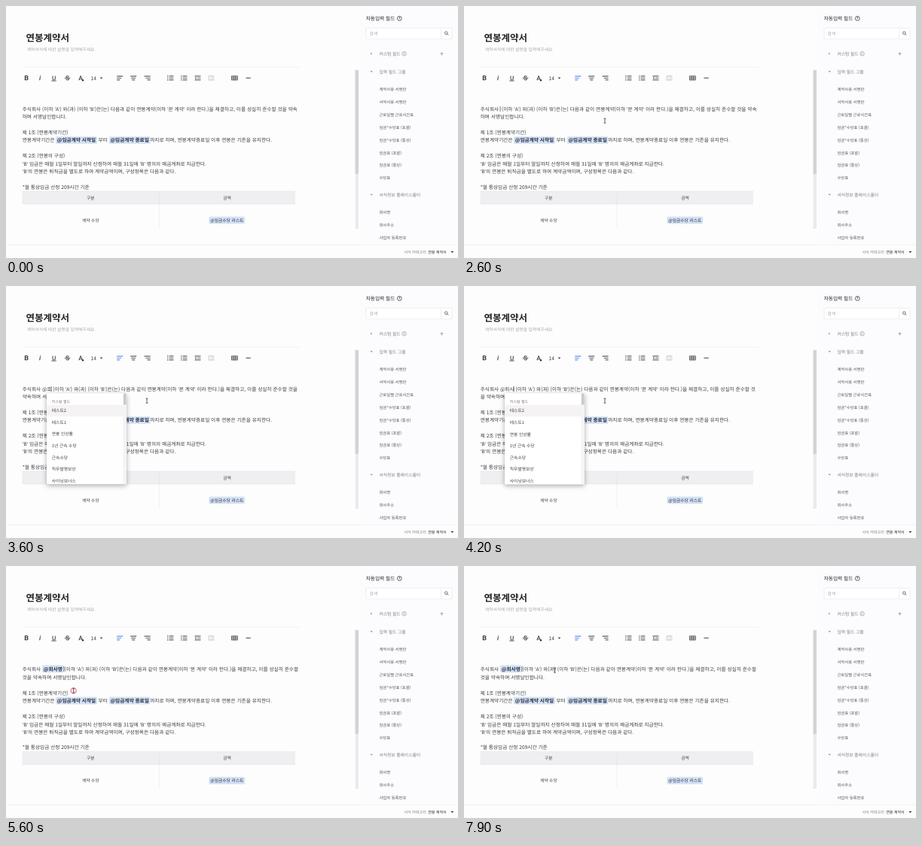
An HTML page for the animation above (8000 ms loop, 600x336 px).

```html
<!DOCTYPE html>
<html lang="ko">
<head>
<meta charset="utf-8">
<style>
html, body { margin: 0; width: 100%; height: 100%; overflow: hidden; background: #fdfdfd; }
svg { display: block; width: 600px; height: 336px; }
text { font-family: "Noto Sans CJK KR", "Noto Sans CJK", "Noto Sans KR", sans-serif; white-space: pre; text-rendering: geometricPrecision; }
.quote { font-family: "Noto Sans", sans-serif; }
.tool { font-family: Roboto, "Liberation Sans", sans-serif; }
.shadow { filter: drop-shadow(0 2px 3px rgba(0,0,0,.32)); }
</style>
</head>
<body>
<svg id="stage" viewBox="0 0 600 336"></svg>
<script>
const LOOP = 8000;
const INK = '#3d3d42', DARK = '#25252a', GREY = '#7b7b80', BLUE = '#3f7fe8';
const BODY = 6.667, SMALL = 5.75, ITEM = 5.35, TINY = 5;
const REST = "(이하 'A') 와(과) (이하 'B')은(는) 다음과 같이 연봉계약(이하 '본 계약' 이라 한다.)을 체결하고, 이를 성실히 준수할 것을 약속하며 서명날인합니다.";

const quoted = str => str.replace(/'/g, '<tspan class="quote">\'</tspan>');
// Text placed by its vertical middle
const text = (x, mid, size, str, fill = INK, attrs = '') =>
  `<text x="${x}" y="${(mid + size * 0.38).toFixed(2)}" font-size="${size}" fill="${fill}" ${attrs}>${quoted(str)}</text>`;
const rect = (x, y, w, h, fill, attrs = '') =>
  `<rect x="${x}" y="${y}" width="${w}" height="${h}" fill="${fill}" ${attrs}/>`;
const line = (d, color, width = 0.5, attrs = '') =>
  `<path d="${d}" stroke="${color}" stroke-width="${width}" fill="none" ${attrs}/>`;
const shape = (d, fill) => `<path d="${d}" fill="${fill}"/>`;
const circle = (x, y, r, color, width = 0.6) =>
  `<circle cx="${x}" cy="${y}" r="${r}" fill="none" stroke="${color}" stroke-width="${width}"/>`;
const chip = (x, mid, w, str, size = BODY, weight = 700) =>
  rect(x, mid - 4.9, w, 9.8, '#d5e1f5', 'rx="1.6"') +
  text(x + w / 2, mid, size, str, '#27303f', `font-weight="${weight}" text-anchor="middle"`);
const MIDDLE = 'text-anchor="middle"';

function header() {
  return text(26.6, 42, 12.5, '연봉계약서', DARK, 'font-weight="700"') +
    text(27.8, 58, SMALL, '계약서식에 대한 설명을 입력해주세요.', '#a9a9ad') +
    line('M22 81.5H390', '#e9e9ec');
}

function alignIcon(x, side, id = '') {
  const d = [8, 6, 4].map((w, i) =>
    `M${x - 4 + (8 - w) * side} ${93.6 + i * 2.5}h${w}`).join('');
  return line(d, INK, 0.95, id);
}

function listIcon(x, numbered) {
  return [93.4, 96, 98.6].map(y =>
    line(`M${x - 1.6} ${y}h5.8`, INK, 0.95) +
    (numbered ? line(`M${x - 3.4} ${y - 0.9}v1.8`, INK, 0.8) : rect(x - 4.1, y - 0.6, 1.2, 1.2, INK))
  ).join('');
}

function indentIcon(x, dir, color) {
  const tip = x - 2.9 + dir * 0.9, back = x - 2.9 - dir * 0.9;
  return line(`M${x - 4} 93.4h8M${x - 0.6} 96h4.6M${x - 4} 98.6h8`, color, 0.9) +
    shape(`M${back} 94.5V97.5L${tip} 96Z`, color);
}

function toolbar() {
  const glyph = (x, s, attrs, size = 9, y = 99.2) =>
    `<text class="tool" x="${x}" y="${y}" font-size="${size}" fill="${INK}" text-anchor="middle" ${attrs}>${s}</text>`;
  return glyph(27.2, 'B', 'font-weight="700"') +
    glyph(45.2, 'i', 'font-weight="500" font-style="italic"') +
    glyph(63.5, 'U', 'font-weight="500"', 8, 98.5) + line('M60.2 99.9h6.6', INK, 0.8) +
    glyph(81.5, 'S', 'font-weight="500"', 8.6) + line('M77.6 96.1h7.8', INK, 0.8) +
    glyph(99.2, 'A', 'font-weight="500"', 8.6) + `<circle cx="102" cy="99" r="1.3" fill="${INK}"/>` +
    text(116.2, 96, BODY, '14', INK, MIDDLE) + shape('M124.6 95.2h3.8l-1.9 2z', INK) +
    alignIcon(151.2, 0, 'id="left"') + alignIcon(169.2, 0.5) + alignIcon(187.6, 1) +
    listIcon(218.2, false) + listIcon(236.2, true) +
    indentIcon(254.5, -1, INK) + indentIcon(272.6, 1, '#b9b9bd') +
    line('M299.5 93.2h7.8v5.6h-7.8zM299.5 95.1h7.8M299.5 97h7.8M302.1 93.2v5.6M304.7 93.2v5.6', INK, 0.75) +
    line('M318.4 96h6.4', INK, 1);
}

function contract() {
  const rows = [
    [168.6, '제 1조 (연봉계약기간)'],
    [199.9, '제 2조 (연봉의 구성)'],
    [210.4, "'B' 임금은 매월 1일부터 말일까지 산정하여 매월 31일에 'B' 명의의 예금계좌로 지급한다."],
    [220.7, "'B'의 연봉은 퇴직금을 별도로 하여 계약금액이며, 구성항목은 다음과 같다."],
    [241.3, '*월 통상임금 산정 209시간 기준']
  ].map(([y, s]) => text(21.7, y, BODY, s)).join('');
  const y = 178.9;
  return rows + text(21.7, y, BODY, '연봉계약기간은') +
    chip(66, y, 55, '@임금계약 시작일') + text(122.6, y, BODY, '부터') +
    chip(136.8, y, 54.6, '@임금계약 종료일') +
    text(191.2, y, BODY, '까지로 하며, 연봉계약종료일 이후 연봉은 기존을 유지한다.') +
    rect(21.5, 247, 362.5, 17, '#efeff2') +
    line('M21.5 247H384M21.5 264H384', '#dedee3') +
    line('M203.2 247V300', '#dcdce1') +
    text(112.3, 255.6, SMALL, '구분', INK, MIDDLE) + text(293.5, 255.6, SMALL, '금액', INK, MIDDLE) +
    text(112.3, 285.6, SMALL, '계약 수당', INK, MIDDLE) +
    chip(269.5, 285.6, 47.6, '@임금수당 리스트', SMALL, 500);
}

function sidebar() {
  const group = (y, s, open) =>
    shape(open ? `M483.6 ${y - 0.8}h3.2l-1.6 1.8z` : `M484.4 ${y - 1.4}v2.8l1.7-1.4z`, GREY) +
    text(495.5, y, SMALL, s, GREY);
  const items = [
    [111.2, '계약사용 서명란'], [128, '서약서용 서명란'], [145, '근로일별 근로시간표'],
    [162, '임금*수당표 (포괄)'], [178.8, '임금*수당표 (통상)'], [195.6, '임금표 (포괄)'],
    [212.4, '임금표 (통상)'], [229.3, '수당표'],
    [275, '회사명'], [292, '회사주소'], [309, '사업자 등록번호']
  ].map(([y, s]) => text(495.4, y, ITEM, s, '#55555a')).join('');
  return rect(470, 0, 130, 318, '#fcfbfd') +
    text(477.7, 16.8, BODY, '자동입력 필드', DARK, 'font-weight="500"') +
    circle(522.3, 16.6, 2.9, DARK, 0.7) + text(522.3, 16.7, 4.6, '?', DARK, 'text-anchor="middle" font-weight="700"') +
    rect(478, 29.3, 114, 14.6, '#fff', 'stroke="#dcdce0" stroke-width=".5" rx="1"') +
    line('M577.3 29.3v14.6', '#dcdce0') +
    text(482.6, 36.6, SMALL, '검색', '#a3a3a8') +
    circle(584.3, 36, 1.8, INK, 0.7) + line('M585.6 37.3l1.7 1.7', INK, 0.8) +
    group(63.6, '커스텀 필드', false) + circle(528.6, 63.6, 2.7, GREY) +
    line('M528.6 63.2v1.8M528.6 62v.6', GREY, 0.6) + line('M576.3 63.6h4.4M578.5 61.4v4.4', GREY, 0.6) +
    group(87.6, '입력 필드 그룹', true) + group(251.6, '서식정보 플레이스홀더', true) + items;
}

function footer() {
  return rect(0, 318, 600, 18, '#fdfdfd') + line('M0 318.4H600', '#e4e4e7') +
    text(528.4, 328, TINY, `서식 카테고리: <tspan fill="${DARK}" font-weight="500">연봉 계약서</tspan>`, GREY) +
    shape('M590.4 327h4l-2 2.2z', INK);
}

function menu(id, w, title, items, active, bar) {
  const list = items.map((s, i) => text(60.8, 166.2 + i * 15.57, SMALL, s)).join('');
  return `<g id="${id}">` + rect(54, 143, w, 121.4, '#fff', 'rx="1.5" class="shadow"') +
    '<g clip-path="url(#menuClip)">' + rect(54, 158.6, w, 15.4, active) +
    text(60.8, 153.8, TINY, title, '#77777c') + list +
    (bar ? rect(155.6, 143, 4.4, 121.4, '#f4f4f5') + rect(156, 143.4, 3.6, 14.8, '#c9c9cc') : '') +
    '</g></g>';
}

const stage = document.getElementById('stage');
stage.innerHTML =
  '<clipPath id="page"><rect x="0" y="82" width="463" height="215"/></clipPath>' +
  '<clipPath id="menuClip"><rect x="54" y="143" width="106" height="121.4" rx="1.5"/></clipPath>' +
  rect(0, 0, 600, 336, '#fdfdfd') + header() + toolbar() +
  '<g clip-path="url(#page)">' + text(21.7, 137.2, BODY, '', INK, 'id="first"') +
  '<g id="field">' + chip(48, 137.2, 28.6, '@회사명') + text(77.6, 137.2, BODY, '', INK, 'id="after"') + '</g>' +
  '<g id="below">' + text(21.7, 147.8, BODY, '', INK, 'id="second"') + contract() + '</g></g>' +
  rect(463.6, 85.5, 4.4, 211.5, '#ebebed') + rect(463.6, 85.5, 4.4, 138.5, '#d3d3d6') +
  sidebar() + footer() +
  line('M0 133.6v7.2', '#222', 0.6, 'id="caret"') +
  menu('full', 106, '커스텀 필드',
    ['테스트2', '테스트1', '연봉 인상률', '1년 근속 수당', '근속수당', '직무발명보상', '사이닝보너스'], '#f5f3f3', true) +
  menu('found', 78, '자동입력 필드', ['회사명', '회사주소', '회사 직인'], '#ededee', false) +
  '<circle id="ring"/><g id="pointer">' +
  line('M-1.4-3H1.4M0-3V3M-1.4 3H1.4', '#222', 0.7, 'id="beam"') +
  '<path id="hand" fill="#fff" stroke="#222" stroke-width=".6" d="M-.8 4V.3a.8.8 0 0 1 1.6 0V2.6l2.4.6q.9.3.8 1.3l-.5 2.6q-.2.7-.9.7H.4q-.6 0-1-.5l-2-2.4q.2-1 1.4-.3z"/></g>';

const el = {};
stage.querySelectorAll('[id]').forEach(n => el[n.id] = n);
const show = (node, on) => node.setAttribute('visibility', on ? 'visible' : 'hidden');
const clamp = v => Math.max(0, Math.min(1, v));
const easeOut = v => 1 - (1 - v) ** 2;

// time, typed head, start of the second line, caret x
const TYPING = [
  [0, '주식회사 ', '하며 서', 46.6],
  [2600, '주식회사  ', '하며 서', 48.1],
  [3000, '주식회사 @ ', '속하며', 54.1],
  [3200, '주식회사 @ㅎ ', '약속하며', 60.2],
  [3500, '주식회사 @호 ', '약속하며', 60.2],
  [3700, '주식회사 @회 ', '약속하며', 60.2],
  [3900, '주식회사 @회ㅅ ', '을 약속', 66.2],
  [4100, '주식회사 @회사 ', '을 약속', 66.2],
  [5550, '주식회사', '것을 약속', 76.9]
];
const PATH = [
  [100, 195, 50], [900, 42, 139.5], [1000, 42, 139.5], [1300, 45, 138], [1600, 45, 138],
  [2100, 187, 153], [4950, 187, 153], [5300, 89.7, 166.2], [5900, 89.7, 166.2],
  [6400, 127, 147], [6700, 120.5, 139]
];
const CLICKS = [1450, 5500];
const INSERT = 5550;

function pointerAt(t) {
  let i = 0;
  while (i < PATH.length - 2 && t >= PATH[i + 1][0]) i++;
  const [t0, x0, y0] = PATH[i], [t1, x1, y1] = PATH[i + 1];
  const p = clamp((t - t0) / (t1 - t0)), e = p * p * (3 - 2 * p);
  return [x0 + (x1 - x0) * e, y0 + (y1 - y0) * e];
}

function caretOn(t) {
  if (t < 1500) return false;
  if (t < 2600) return t < 2050;
  if (t < 4100) return true;
  const start = t < INSERT ? 4150 : INSERT;
  return (t - start) % 1000 < 500;
}

function setText(t) {
  const [, head, cut, x] = TYPING.filter(s => s[0] <= t).pop();
  const at = REST.indexOf(cut), done = t >= INSERT;
  const lead = quoted(REST.slice(0, at).trimEnd());
  el.first.innerHTML = done ? head : head + lead;
  el.after.innerHTML = lead;
  el.second.textContent = REST.slice(at);
  show(el.field, done);
  el.below.setAttribute('transform', `translate(0 ${done ? 0.6 : 0})`);
  el.caret.setAttribute('transform', `translate(${x} 0)`);
  show(el.caret, caretOn(t));
}

function setMenus(t) {
  const e = easeOut(clamp((t - 3365) / 250)), k = 0.8 + 0.2 * e;
  show(el.full, t > 3365 && t < 4600);
  el.full.setAttribute('opacity', e);
  el.full.setAttribute('transform', `translate(107 143) scale(${k}) translate(-107 -143)`);
  show(el.found, t >= 4600 && t < 5590);
  el.found.setAttribute('opacity', 1 - clamp((t - 5500) / 90));
}

function setPointer(t) {
  const [x, y] = pointerAt(t);
  const hand = t > 4950 && t < INSERT && x < 132;
  show(el.pointer, t >= 100);
  show(el.hand, t >= 100 && hand);
  show(el.beam, t >= 100 && !hand);
  el.pointer.setAttribute('transform', `translate(${x} ${y})`);
  const age = t - CLICKS.filter(c => c <= t).pop();
  show(el.ring, age < 300);
  if (!(age < 300)) return;
  const attrs = {
    cx: x, cy: y, r: 2.7 + age * 0.01, fill: '#d8455c', stroke: '#dd4a50', 'stroke-width': 0.8,
    'fill-opacity': 0.9 * (1 - clamp(age / 105)) + 0.06, opacity: 1 - clamp((age - 120) / 180)
  };
  for (const k in attrs) el.ring.setAttribute(k, attrs[k]);
}

function render(t) {
  setText(t);
  setMenus(t);
  setPointer(t);
  el.left.setAttribute('stroke', t >= 1600 ? BLUE : INK);
}

const begin = performance.now();
function tick() {
  render((performance.now() - begin) % LOOP);
  requestAnimationFrame(tick);
}
tick();
</script>
</body>
</html>
```
